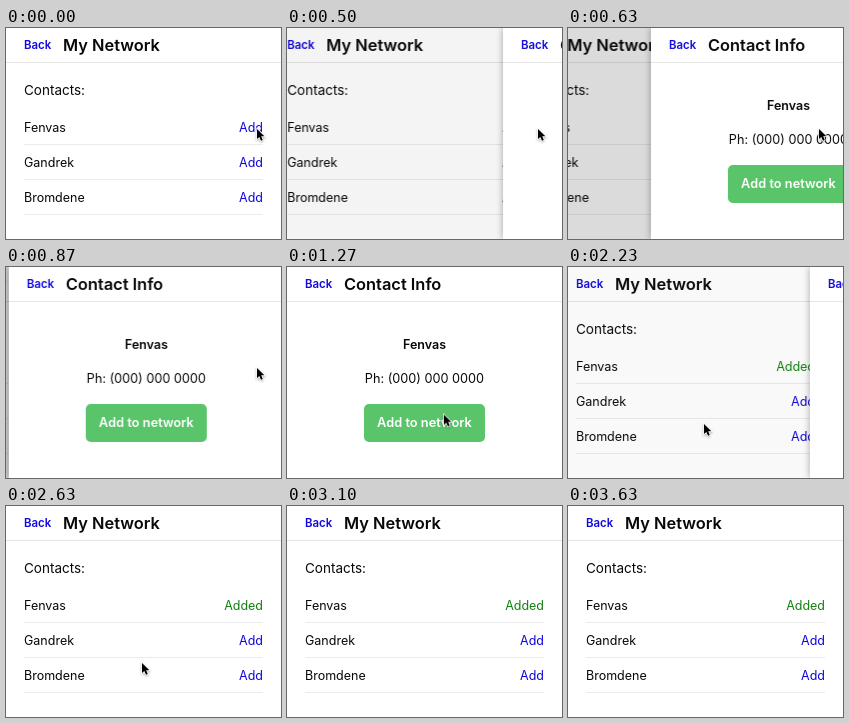
These frames come from a looping animation (275x211 px, 3.93 s). An HTML page:

```html
<!DOCTYPE html>
<html lang="en">
<head>
<meta charset="utf-8">
<title>My Network</title>
<style>
  html, body { margin: 0; width: 100%; height: 100%; overflow: hidden; background: #fff; }
  #stage {
    position: relative; width: 275px; height: 211px; overflow: hidden;
    background: #fff; color: #080808; font: 12.5px/20px Inter, sans-serif;
  }
  .page { position: absolute; inset: 0; background: #fff; will-change: transform; }
  #contact { box-shadow: 0 0 7px rgba(0, 0, 0, .35); opacity: 0; }
  .page > * { position: absolute; white-space: nowrap; }
  header { left: 0; top: 0; width: 100%; height: 34px; border-bottom: 1px solid #e6e6e6; }
  header * { position: absolute; top: 7px; margin: 0; line-height: 20px; font-weight: 600; }
  header b { left: 18px; font-size: 11.4px; }
  header h1 { left: 57px; font-size: 16.4px; }
  header b, .add { color: #1208dd; }
  h2 { left: 18px; top: 52px; margin: 0; font-size: 13.5px; font-weight: 400; line-height: 20px; }
  .row { left: 18px; width: 239px; height: 34px; line-height: 35px; border-bottom: 1px solid #ebebeb; }
  .row span { position: absolute; right: 0; top: 0; }
  .added { color: #128212; opacity: 0; }
  .mid { left: 0; width: 100%; text-align: center; }
  .name { top: 68px; font-weight: 600; }
  .phone { top: 102px; font-size: 12.7px; }
  #button {
    left: 77px; top: 137px; width: 121px; height: 38px; border-radius: 5px;
    background: #5ac46a; color: #fff; font-size: 12.8px; font-weight: 600;
    line-height: 38px; text-align: center;
  }
  #dim { inset: 0; background: #000; opacity: 0; }
  #cursor { position: absolute; left: -2px; top: -2px; filter: drop-shadow(0 1px 1px rgba(0, 0, 0, .3)); }
</style>
</head>
<body>
<div id="stage">
  <div class="page" id="list">
    <header><b>Back</b><h1>My Network</h1></header>
    <h2>Contacts:</h2>
    <div class="row" style="top:82px">Fenvas<span class="add" id="add">Add</span><span class="added" id="added">Added</span></div>
    <div class="row" style="top:117px">Gandrek<span class="add">Add</span></div>
    <div class="row" style="top:152px">Bromdene<span class="add">Add</span></div>
    <div id="dim"></div>
  </div>
  <div class="page" id="contact">
    <header><b>Back</b><h1>Contact Info</h1></header>
    <div class="mid name">Fenvas</div>
    <div class="mid phone">Ph: (000) 000 0000</div>
    <div id="button">Add to network</div>
  </div>
  <svg id="cursor" width="14" height="18" viewBox="-2 -2 14 18">
    <path d="M0 0V10L2.3 8L4 11.8L5.8 11L4.2 7.3H7.4Z" fill="#000" stroke="#fff" stroke-width="1.4" paint-order="stroke"/>
  </svg>
</div>
<script>
const LOOP = 3930;
const OPEN = [415, 940], CLOSE = [1935, 2435];
const PARALLAX = 0.3, WIDTH = 275;

// Each step: [time in ms, value, easing towards the next step]
function play(id, prop, steps, format = v => v) {
  const frames = steps.map(([t, v, easing = 'linear']) =>
    ({ offset: t / LOOP, [prop]: format(v), easing }));
  document.getElementById(id).animate(frames, { duration: LOOP, iterations: Infinity });
}

// Runs from `rest` to `shown` while the contact page is open, then back
const slide = (rest, shown) => [
  [0, rest], [OPEN[0], rest, 'ease'], [OPEN[1], shown],
  [CLOSE[0], shown, 'ease'], [CLOSE[1], rest], [LOOP, rest]
];

// Holds `on` between two times with hard edges
const during = (a, b, on, off) => [
  [0, off], [a, off], [a, on], [b, on], [b, off], [LOOP, off]
];

const shiftX = x => `translateX(${x}px)`;
const shift = ([x, y]) => `translate(${x}px, ${y}px)`;

play('contact', 'transform', slide(WIDTH, 0), shiftX);
play('contact', 'opacity', during(OPEN[0], 2470, 1, 0));
play('list', 'transform', slide(0, -WIDTH * PARALLAX), shiftX);
play('dim', 'opacity', slide(0, 0.2));

play('add', 'opacity', [
  [0, 1], [370, 1], [370, 0.65], [470, 0.65], [600, 1],
  [1930, 1], [1930, 0], [LOOP, 0]
]);
play('added', 'opacity', [[0, 0], [1930, 0], [1930, 1], [LOOP, 1]]);
play('button', 'opacity', during(1930, 2060, 0.7, 1));

play('cursor', 'transform', [
  [0, [251, 101]], [950, [251, 101], 'ease-in-out'],
  [1420, [132, 160], 'ease-out'], [1700, [136, 157]],
  [2640, [136, 157], 'ease-in'], [2970, [290, 91]], [LOOP, [290, 91]]
], shift);
</script>
</body>
</html>
```
